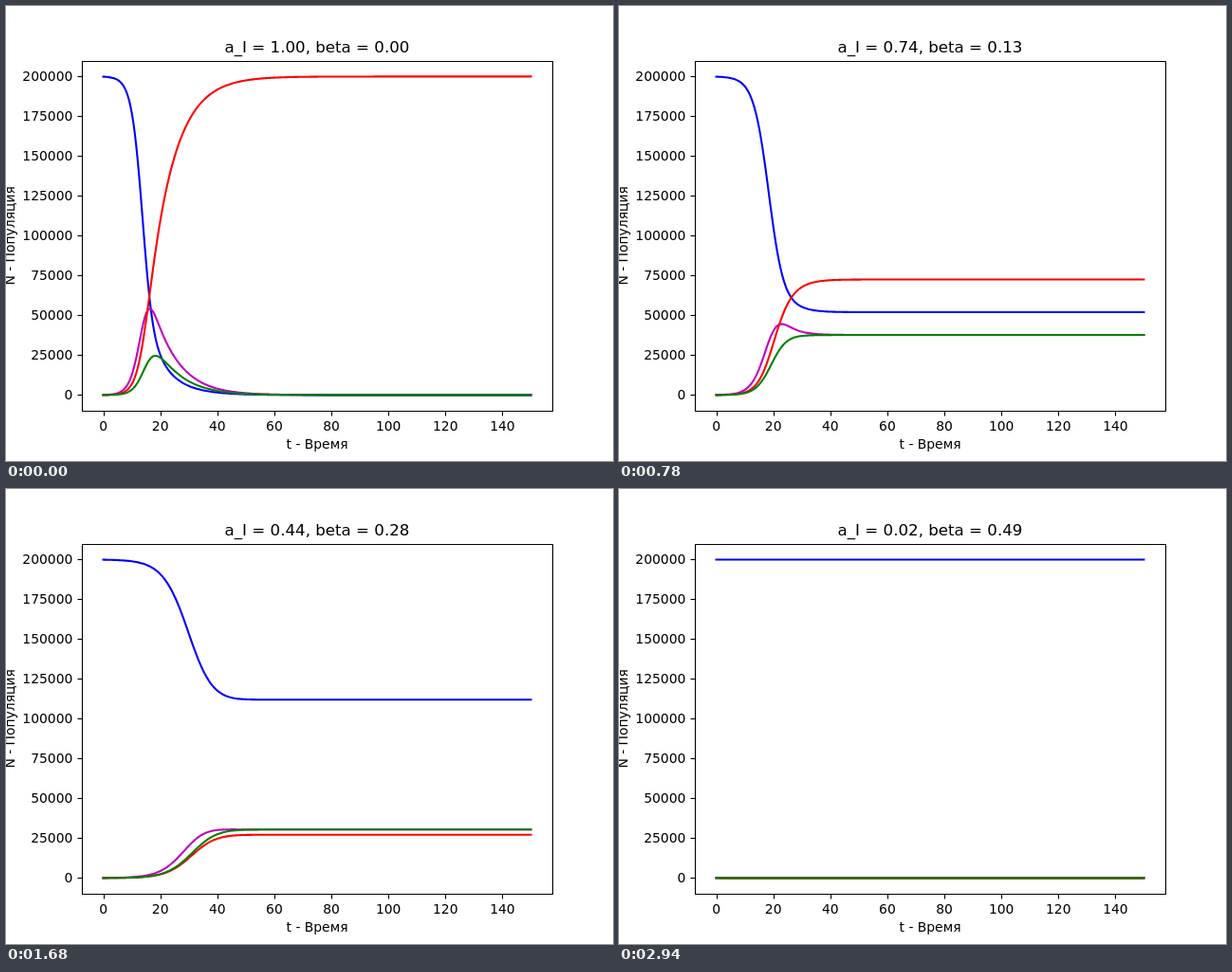
An HTML page with a canvas that plays this animation: 640x480 px, repeating every 3000 ms.

```html
<!DOCTYPE html>
<html lang="ru">
<head>
<meta charset="utf-8">
<title>SEIR</title>
<style>
  html, body { margin: 0; width: 100%; height: 100%; overflow: hidden; background: #fff; }
  canvas { display: block; }
</style>
</head>
<body>
<canvas id="stage" width="640" height="480"></canvas>
<script>
const ctx = document.getElementById('stage').getContext('2d');
const POP = 200000, T_END = 150, DT = 0.5;
const STEPS = 50, STEP_MS = 60;
const COLORS = ['#0000ff', '#bf00bf', '#ff0000', '#008000'];
const LEFT = 80.5, RIGHT = 576.5, TOP = 58.5, BOTTOM = 427.5;

const px = t => 102.545 + t * 450.909 / T_END;
const py = n => 410.4 - n * 336 / POP;
const snap = v => Math.floor(v + 0.5) + 0.5;

// SEIR rates: susceptible, exposed, infected, recovered
function rates([s, e, i, r], aI, beta) {
  const caught = s * (aI * i + 0.5 * e) / POP;
  return [
    0.5 * r - caught,
    caught - 0.5 * e,
    0.25 * e - beta * i,
    0.25 * e + beta * i - 0.5 * r
  ];
}

// Runge-Kutta integration over the whole time span
function solve(aI, beta) {
  const f = y => rates(y, aI, beta);
  const shift = (y, k, h) => y.map((v, j) => v + k[j] * h);
  let y = [POP - 100, 0, 100, 0];
  const path = [y];
  for (let n = 0; n < T_END / DT; n++) {
    const k1 = f(y);
    const k2 = f(shift(y, k1, DT / 2));
    const k3 = f(shift(y, k2, DT / 2));
    const k4 = f(shift(y, k3, DT));
    y = y.map((v, j) => v + DT / 6 * (k1[j] + 2 * k2[j] + 2 * k3[j] + k4[j]));
    path.push(y);
  }
  return path;
}

function text(str, x, y, align = 'center', size = 13.889) {
  ctx.font = `${size}px "DejaVu Sans", sans-serif`;
  ctx.textAlign = align;
  ctx.fillText(str, x, y);
}

function line(x1, y1, x2, y2) {
  ctx.beginPath();
  ctx.moveTo(x1, y1);
  ctx.lineTo(x2, y2);
  ctx.stroke();
}

function drawAxes() {
  ctx.fillStyle = ctx.strokeStyle = '#000';
  ctx.lineWidth = 1.11;
  ctx.lineCap = 'butt';
  ctx.strokeRect(LEFT, TOP, RIGHT - LEFT, BOTTOM - TOP);
  for (let t = 0; t <= 140; t += 20) {
    const x = snap(px(t));
    line(x, BOTTOM, x, BOTTOM + 5);
    text(t, px(t), 448);
  }
  for (let n = 0; n <= POP; n += 25000) {
    const y = snap(py(n));
    line(LEFT - 5, y, LEFT, y);
    text(n, 70.3, py(n) + 5, 'right');
  }
  text('t - Время', 328, 467);
  ctx.save();
  ctx.translate(8.5, 242.4);
  ctx.rotate(-Math.PI / 2);
  text('N - Популяция', 0, 0);
  ctx.restore();
}

function drawCurves(path) {
  ctx.lineWidth = 2.083;
  ctx.lineCap = 'square';
  ctx.lineJoin = 'round';
  COLORS.forEach((color, j) => {
    ctx.strokeStyle = color;
    ctx.beginPath();
    path.forEach((y, n) => ctx.lineTo(px(n * DT), py(y[j])));
    ctx.stroke();
  });
}

let shown = -1;
function tick() {
  const step = Math.floor(performance.now() / STEP_MS) % STEPS;
  if (step !== shown) {
    shown = step;
    const aI = 1 - 0.02 * step, beta = 0.01 * step;
    ctx.fillStyle = '#fff';
    ctx.fillRect(0, 0, 640, 480);
    drawCurves(solve(aI, beta));
    drawAxes();
    text(`a_I = ${aI.toFixed(2)}, beta = ${beta.toFixed(2)}`, 328, 49.3, 'center', 16.667);
  }
  requestAnimationFrame(tick);
}
tick();
</script>
</body>
</html>
```
